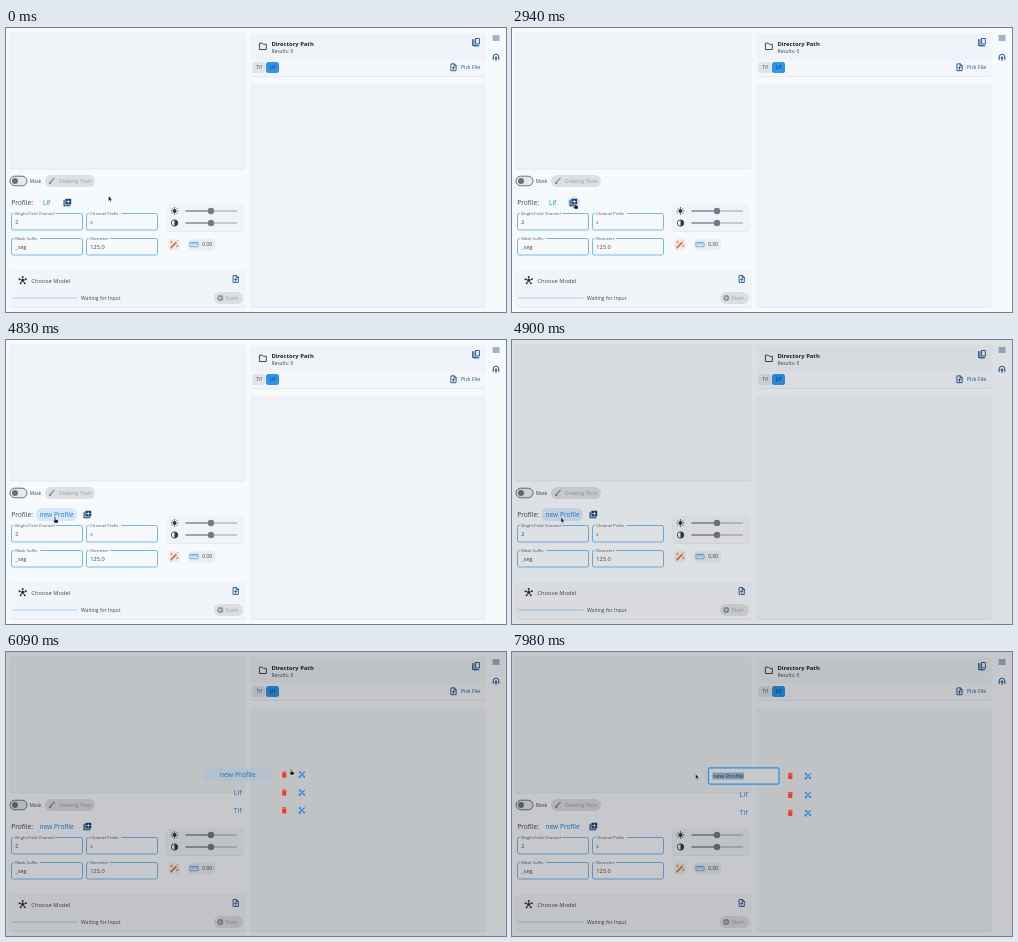
An HTML page for the animation above (8000 ms loop, 500 by 284 pixels).

```html
<!DOCTYPE html>
<html lang="en">
<head>
<meta charset="utf-8">
<title>Profile editor</title>
<style>
html, body { margin: 0; width: 100%; height: 100%; overflow: hidden; background: #f7fafd; }
svg { display: block; width: 100vw; height: 100vh; }
text { font-family: "Open Sans", "Noto Sans", sans-serif; fill: #42474e; white-space: pre; }
.line { fill: none; stroke-linecap: round; stroke-linejoin: round; }
</style>
</head>
<body>
<svg id="stage" viewBox="0 0 500 284">
  <defs>
    <filter id="shadow" x="-5%" y="-10%" width="110%" height="125%">
      <feDropShadow dx="0" dy=".5" stdDeviation=".7" flood-color="#56606c" flood-opacity=".22"/>
    </filter>
    <g id="add">
      <path d="M-3.4-2V3.4H2.4" class="line" stroke="#123f73" stroke-width="1.1"/>
      <rect x="-2.1" y="-3.6" width="5.8" height="5.8" rx=".7" fill="#123f73"/>
      <path d="M.8-2.2V.8M-.7-.7H2.3" class="line" stroke="#f7fafd" stroke-width=".8"/>
    </g>
    <g id="bin" fill="#f0392f">
      <path d="M-1.9-1.5H1.9V2.4Q1.9 3-1.3 3Q-1.9 3-1.9 2.4Z"/>
      <path d="M-1.9-1.5H1.9V2.3Q1.9 3 1.2 3H-1.2Q-1.9 3-1.9 2.3Z"/>
      <path d="M-2.4-2.8H-1L-.6-3.2H.6L1-2.8H2.4V-2H-2.4Z"/>
    </g>
    <g id="pen" class="line" stroke="#1c83dd" stroke-width="1.1">
      <path d="M-2.6 2.6L2.4-2.4M-2.6-2.6L-.8-.8M1 1L2.6 2.6"/>
      <path d="M-2.8-1.5L-1.5-2.8M1.4 2.8L2.8 1.4M-2.8 2.8V1.4M-2.8 2.8H-1.4" stroke-width=".8"/>
    </g>
    <g id="file" class="line" stroke="#1f4f8c" stroke-width=".9">
      <path d="M.7-3.4H-2.6V3.4H2.6V-1.4ZV-1.4H2.6"/>
      <path d="M0 2V-.3M-1.1.7L0-.4L1.1.7"/>
    </g>
  </defs>
  <g id="base"></g>
  <g id="profile">
    <rect id="profileHover" x="30" y="168" width="41" height="13" rx="5.5" fill="#d7e7f8"/>
    <circle id="addHover" cx="62" cy="174.5" r="6.3" fill="#dce4ee"/>
    <text id="profileName" y="176.8" font-size="6.6" style="fill:#1b82dd"></text>
    <use id="addIcon" href="#add"/>
  </g>
  <rect id="barrier" width="500" height="284"/>
  <g id="dialog"></g>
  <g id="cursor" stroke="#fff" stroke-width=".35" stroke-linejoin="round" fill="#111">
    <path id="arrow" d="M0 0V5.2L1.2 4.1L2 5.9L2.9 5.5L2.1 3.8H3.7Z"/>
    <path id="hand" d="M-.5-.2Q.1-.9.6-.2V2L2.6 2.4Q3.3 2.6 3.2 3.4L2.7 5.6H0L-1.7 3.5Q-1.6 2.6-.5 3.2Z"/>
    <path id="beam" d="M-.9-2.8H.9M0-2.8V2.8M-.9 2.8H.9" stroke="#222" stroke-width=".7"/>
  </g>
</svg>
<script>
const NS = "http://www.w3.org/2000/svg";
const LOOP = 8000, TICK = 70;
const $ = id => document.getElementById(id);
const base = $("base"), dialog = $("dialog");

function add(parent, tag, attrs, content) {
  const node = document.createElementNS(NS, tag);
  for (const key in attrs) node.setAttribute(key, attrs[key]);
  if (content !== undefined) node.textContent = content;
  return parent.appendChild(node);
}
const box = (x, y, width, height, rx, fill, extra) =>
  add(base, "rect", { x, y, width, height, rx, fill, ...extra });
const dot = (cx, cy, r, fill) => add(base, "circle", { cx, cy, r, fill });
const line = (d, stroke, width = 1) =>
  add(base, "path", { d, class: "line", stroke, "stroke-width": width });
const label = (content, x, y, size, fill = "#42474e", extra = {}, parent = base) =>
  add(parent, "text", { x, y, "font-size": size, style: `fill:${fill}`, ...extra }, content);
const icon = (name, x, y, parent = base) =>
  add(parent, "use", { href: "#" + name, transform: `translate(${x} ${y})` });
const card = (x, y, w, h, fill = "#eff3f7") => box(x, y, w, h, 3, fill, { filter: "url(#shadow)" });

function field(name, value, x, y, gap) {
  box(x + .5, y + .5, 71, 16.5, 1.8, "#f7fafd", { stroke: "#68aef2", "stroke-width": .9 });
  box(x + 3, y - .5, gap, 2, 0, "#f7fafd");
  label(name, x + 4.2, y + 1.9, 4.2, "#555a62");
  label(value, x + 4.3, y + 10.7, 5.6);
}

function slider(y) {
  line(`M205 ${y}H230.5`, "#b9bdc2", 1.3);
  line(`M180 ${y}H205`, "#85898e", 1.5);
  dot(205, y, 3.2, "#777b80");
}

function drawBase() {
  const blue = "#1f4f8c", dark = "#33373c", muted = "#999da3";
  box(0, 0, 500, 284, 0, "#f7fafd");
  card(3.5, 4.5, 236.5, 136);
  card(244, 5, 236, 43, "#f3f6fa");
  box(245, 5.5, 234, 26, 2, "#eff3f7");
  card(244, 56, 236, 223);
  card(160.5, 176.5, 77, 26.5, "#f0f3f7");
  card(3.5, 242, 236.5, 37, "#f1f4f8");

  // Directory header
  line("M253.8 15.2H256.4L257.4 16.3H260.3V21.5H253.8Z", dark, .9);
  label("Directory Path", 265.4, 17.9, 5.85, "#1d2126", { "font-weight": 700 });
  label("Results: 0", 265.4, 24.8, 4.95);
  line("M468 11.6V17.8H473M470 10.5H473.4V16H469.6V10.5Z", blue, .9);
  line("M466.6 11.5V17.7H471", blue, .9);
  box(246.5, 34, 13, 11, 2.5, "#dfe4ea");
  box(260, 34, 13, 11, 2.5, "#2c94ec");
  label("Tif", 253, 41.4, 5, "#50555c", { "text-anchor": "middle" });
  label("Lif", 266.5, 41.4, 5, "#102f50", { "text-anchor": "middle" });
  icon("file", 447.5, 39.3);
  label("Pick File", 455, 41.2, 5.15, "#245895");

  // Side rail
  line("M487 8H493.2M487 10H493.2M487 12H493.2", "#2b5c9c", .9);
  line("M487.2 30V29A2.8 2.8 0 0 1 492.8 29V30M487.2 30V31.7M492.8 30V31.7", "#2b5c9c", 1);
  dot(490, 29.8, 1.3, "#2b5c9c");
  line("M490 30V32.6", "#2b5c9c", 1);

  // Mask and drawing tools
  box(4, 148.2, 17, 9.6, 4.8, "#e5e8ec", { stroke: "#63676d", "stroke-width": .9 });
  dot(9, 153, 3, "#6e7278");
  label("Mask", 23.7, 154.9, 4.7);
  box(39, 147, 50, 12, 6, "#dddfe3");
  line("M43.8 154.8L48.2 150.4M43.4 155.4L45 155", "#878b91", 1.3);
  label("Drawing Tools", 53, 154.8, 5, muted);

  // Profile settings
  label("Profile:", 5.2, 176.8, 6.7);
  field("Bright-Field Channel", "2", 5, 185, 42);
  field("Channel Prefix", "c", 80, 185, 32);
  field("Mask Suffix", "_seg", 5, 210, 26);
  field("Diameter", "125.0", 80, 210, 21);

  // Brightness, contrast and tools
  dot(168.5, 183, 1.9, dark);
  for (let i = 0; i < 8; i++) {
    const a = i * Math.PI / 4, c = Math.cos(a), s = Math.sin(a);
    line(`M${168.5 + 2.7 * c} ${183 + 2.7 * s}L${168.5 + 3.4 * c} ${183 + 3.4 * s}`, dark, .8);
  }
  line("M171.7 195A3.2 3.2 0 1 1 165.3 195A3.2 3.2 0 1 1 171.7 195", dark, .8);
  add(base, "path", { d: "M168.5 191.8A3.2 3.2 0 0 1 168.5 198.2Z", fill: dark });
  slider(183);
  slider(195);
  box(162, 210.5, 12, 12, 4.5, "#ebeff4");
  line("M165 219.7L170 214.7", "#ee6c2b", 1.8);
  line("M165.5 213.2V214.8M164.7 214H166.3M171.3 217.2V218.8M170.5 218H172.1M171.4 212.8L171.9 212.3", "#ee6c2b", .7);
  box(182, 210.8, 27.5, 11.4, 4.5, "#e8edf3");
  line("M184.4 214.3H192V218.7H184.4ZM186.3 214.5V216.3M188.2 214.5V216.3M190.1 214.5V216.3", "#5f9bd8", .8);
  label("0.00", 196.2, 218.3, 5.1);

  // Model card
  for (const [x, y] of [[0, -3.3], [3.2, -1], [2, 3], [-2, 3], [-3.2, -1]]) {
    line(`M16.7 252.3l${x} ${y}`, dark, .7);
    dot(16.7 + x, 252.3 + y, 1, dark);
  }
  dot(16.7, 252.3, 1.6, dark);
  label("Choose Model", 25.3, 254.5, 5.85);
  icon("file", 229.7, 251);
  line("M6.5 270H71", "#a4d0f8", 1);
  label("Waiting for Input", 75, 272, 5.05);
  box(208, 264, 29, 12, 6, "#dcdee2");
  dot(214.3, 270, 3, "#8f9398");
  add(base, "path", { d: "M213.4 268.4L216 270L213.4 271.6Z", fill: "#dcdee2" });
  label("Start", 219.3, 272, 5.8, muted);
}

const parts = {};
function drawDialog() {
  const blue = "#1672c4", middle = { "text-anchor": "middle" };
  parts.pill = add(dialog, "rect", { x: 196, y: 116, width: 71, height: 13, rx: 6, fill: "#b4c1cd" });
  parts.penHover = add(dialog, "circle", { cx: 296, cy: 122.5, r: 6.3, fill: "#b3bfca" });
  parts.rows = ["new Profile", "Lif", "Tif"].map(name => {
    const row = add(dialog, "g", {});
    const text = label(name, 231.7, 2.3, 6.9, blue, middle, row);
    icon("bin", 278.3, 0, row);
    icon("pen", 296, 0, row);
    return { row, text };
  });
  parts.editor = add(dialog, "g", {});
  add(parts.editor, "rect", { x: 196.5, y: 115.9, width: 70.6, height: 16.2, rx: 1.5,
    fill: "#c5c9cc", stroke: "#2a8fe6", "stroke-width": 1.2 });
  parts.selection = add(parts.editor, "rect", { y: 120.5, height: 7, fill: "#7f9bb5" });
  label("new Profile", 200.7, 126.1, 5.95, "#343a41", {}, parts.editor);
}

// Cursor waypoints: time, x, y
const path = [
  [0, 102.5, 168], [2380, 102.5, 168], [2870, 63, 175.5], [3430, 63, 175.5],
  [4410, 49, 177.5], [4970, 49, 177.5], [5740, 285, 117.5], [6090, 285, 117.5],
  [6440, 296, 122.5], [7000, 296, 122.5], [7350, 234, 124], [7490, 234, 124],
  [7910, 183.5, 122], [LOOP, 183.5, 122]
];

function cursorAt(t) {
  const i = path.findIndex(p => p[0] > t);
  const [t0, x0, y0] = path[i - 1], [t1, x1, y1] = path[i];
  const u = (t - t0) / (t1 - t0), e = u * u * (3 - 2 * u);
  return [x0 + (x1 - x0) * e, y0 + (y1 - y0) * e];
}

const clamp = (v, lo, hi) => Math.min(hi, Math.max(lo, v));
const show = (node, on) => node.setAttribute("visibility", on ? "inherit" : "hidden");
const near = (x, y, cx, cy, r) => Math.hypot(x - cx, y - cy) < r;

function render(t) {
  const [x, y] = cursorAt(t);
  const renamed = t >= 3150, open = t >= 4900, editing = t >= 6650;
  const fade = clamp((t - 4830) / 140, 0, 1);
  const overAdd = !renamed && near(x, y, 62, 174.5, 6.5);
  const overProfile = renamed && x < 71;
  const overPen = open && near(x, y, 296, 122.5, 6.5);
  const overField = editing && x > 196.5 && x < 267;

  $("profileName").textContent = renamed ? "new Profile" : "Lif";
  $("profileName").setAttribute("x", renamed ? 33.5 : 37);
  $("addIcon").setAttribute("transform", `translate(${renamed ? 81.5 : 61.5} 174.3)`);
  show($("profileHover"), overProfile && t < 5040);
  show($("addHover"), overAdd);

  $("barrier").setAttribute("opacity", .2 * fade);
  dialog.setAttribute("opacity", clamp((t - 4900) / 140, 0, 1));
  show(dialog, open);
  show(parts.pill, !editing);
  show(parts.penHover, overPen);
  show(parts.editor, editing);
  show(parts.rows[0].text, !editing);
  const tops = editing ? [124, 143, 161] : [122.5, 140.5, 158.3];
  parts.rows.forEach(({ row }, i) => row.setAttribute("transform", `translate(0 ${tops[i]})`));

  const left = t >= 7490 ? clamp(x, 200.5, 232) : 232;
  parts.selection.setAttribute("x", left);
  parts.selection.setAttribute("width", 232 - left);

  const hand = overAdd || (overProfile && t < 4900) || overPen ||
    (open && !editing && near(x, y, 282, 120, 8));
  $("cursor").setAttribute("transform", `translate(${x} ${y})`);
  show($("hand"), hand);
  show($("beam"), overField);
  show($("arrow"), !hand && !overField);
}

drawBase();
drawDialog();
const start = performance.now();
function frame() {
  const t = (performance.now() - start) % LOOP;
  render(Math.floor(t / TICK) * TICK);
  requestAnimationFrame(frame);
}
frame();
</script>
</body>
</html>
```
